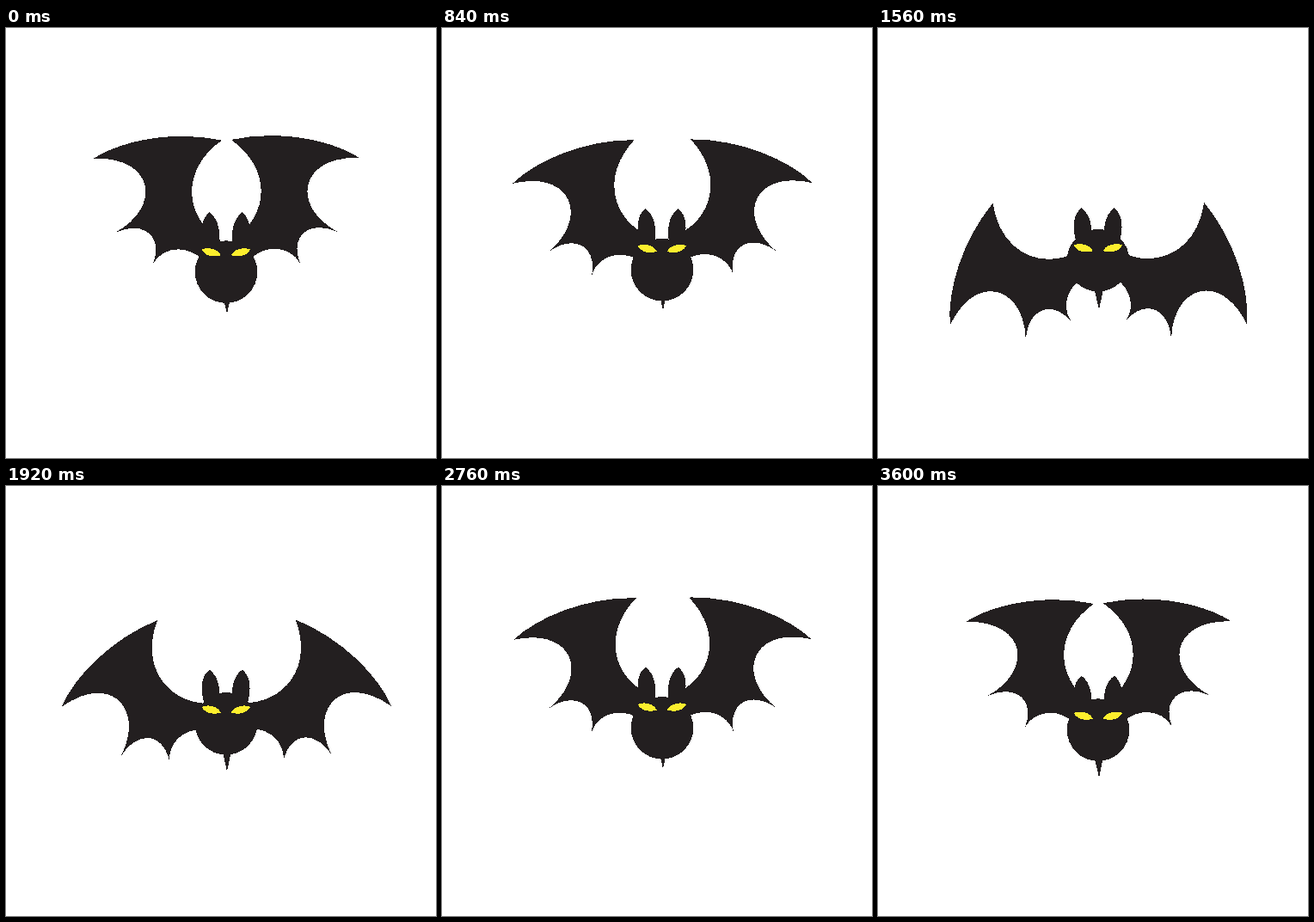
Recreate the animation shown at these times as an HTML page. Size 500 by 500 pixels, loop 3.62 s.

```html
<!DOCTYPE html>
<html lang="en">
<head>
<meta charset="utf-8">
<title>Flapping bat</title>
<style>
  html, body { margin: 0; width: 100%; height: 100%; overflow: hidden; background: #fff; }
  svg { display: block; width: 100vw; height: 100vh; fill: #231f20; shape-rendering: crispEdges; }
  .eye { fill: #fcee2d; }
</style>
</head>
<body>
<svg viewBox="0 0 500 500">
  <defs>
    <path id="wing" d="M102 152C135 131 195 119 251 131C203 165 207 219 248 246L257 262V275L228 269
      C207 250.5 181 256.5 171 274.5C183.5 241.5 159 224 127.5 238C182 208 172 150 102 152Z"/>
    <path id="ear" d="M236.5 214.7C226 223 226 239 230.5 254H247C250 240 248 223 236.5 214.7Z"/>
    <path id="eye" d="M227.5 258C234 255 246 256.5 250 264.7C242 267 232 266.5 227.5 258Z"/>
  </defs>
  <g class="bob">
    <g class="flap"><use href="#wing"/></g>
    <g transform="translate(512.8 -.7) scale(-1 1)">
      <g class="flap"><use href="#wing"/></g>
    </g>
  </g>
  <circle id="body" cx="256" r="36.3"/>
  <g class="bob">
    <use href="#ear"/>
    <use href="#ear" transform="translate(511.2) scale(-1 1)"/>
    <path d="M249.5 300H264L257 333Z"/>
    <g class="eye">
      <use href="#eye"/>
      <use href="#eye" transform="translate(511.6) scale(-1 1)"/>
    </g>
  </g>
</svg>
<script>
  const LOOP = 3620, STEP = 20;
  const DOWN = 230, UP = 220;   // wing stroke times
  const SWING = 64, BOB = 6.5, BOB_PERIOD = 321, LIFT = 0.4;

  const bobs = document.querySelectorAll('.bob');
  const flaps = document.querySelectorAll('.flap');
  const body = document.getElementById('body');
  const start = performance.now();

  const ease = x => x * x * (3 - 2 * x);

  // 0 = wings raised, 1 = wings lowered
  function stroke(t) {
    const s = t % (DOWN + UP);
    return s < DOWN ? ease(s / DOWN) : 1 - ease((s - DOWN) / UP);
  }

  function draw() {
    const elapsed = (performance.now() - start) % LOOP;
    const t = Math.floor(elapsed / STEP) * STEP;
    const p = stroke(t);
    const dy = BOB * Math.sin(2 * Math.PI * t / BOB_PERIOD) - LIFT;
    bobs.forEach(g => g.setAttribute('transform', `translate(0 ${dy})`));
    flaps.forEach(g => g.setAttribute('transform', `rotate(${-SWING * p} 256.4 266.5)`));
    body.setAttribute('cy', 283.6 - 13.7 * p);
    requestAnimationFrame(draw);
  }
  draw();
</script>
</body>
</html>
```
